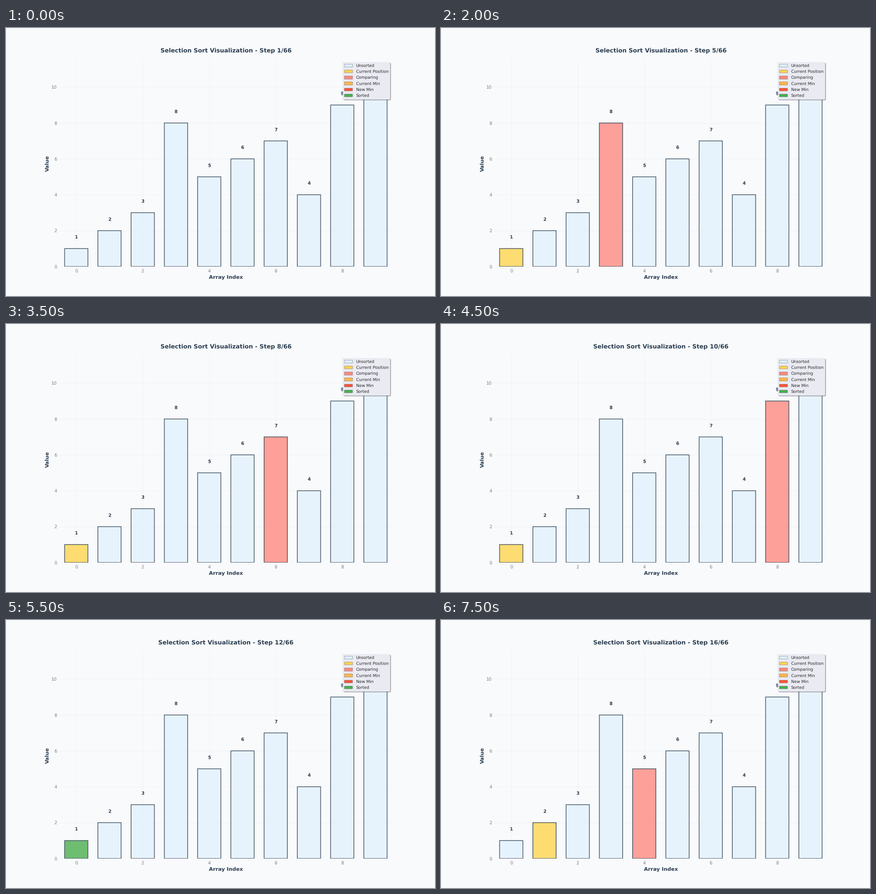
These frames come from a looping animation (947x592 px, 8 s). A matplotlib script:

```python
from itertools import islice

import matplotlib.pyplot as plt
from matplotlib.animation import FuncAnimation
from matplotlib.patches import Patch

plt.rcParams.update({
    "font.family": "DejaVu Sans",
    "text.hinting": "none",
    "toolbar": "None",
})

WIDTH, HEIGHT = 947, 592
DPI = WIDTH / 16
STEPS, STEP_MS, TOTAL_STEPS = 16, 500, 66

VALUES = [1, 2, 3, 8, 5, 6, 7, 4, 9, 10]
BACKGROUND = "#F8FAFC"
INK = "#2C3E50"
COLORS = {
    "Unsorted": "#E3F2FD",
    "Current Position": "#FFD54F",
    "Comparing": "#FF8A80",
    "Current Min": "#FFB74D",
    "New Min": "#FF5733",
    "Sorted": "#4CAF50",
}


def sort_steps(count):
    """Yield the highlighted bars of each step as {index: state}."""
    yield {}
    for i in range(count):
        yield {i: "Current Position"}
        for j in range(i + 1, count):
            yield {i: "Current Position", j: "Comparing"}
        yield {i: "Sorted"}


steps = list(islice(sort_steps(len(VALUES)), STEPS))

fig, ax = plt.subplots(figsize=(WIDTH / DPI, HEIGHT / DPI), dpi=DPI)
fig.set_facecolor(BACKGROUND)
ax.set_facecolor(BACKGROUND)
fig.subplots_adjust(left=0.125, right=0.9, bottom=0.11, top=0.88)

bars = ax.bar(range(len(VALUES)), VALUES, width=0.7, alpha=0.8,
              color=COLORS["Unsorted"], edgecolor=INK, linewidth=2)
for x, value in enumerate(VALUES):
    bars[x].set_snap(False)
    ax.text(x, value + 0.5, str(value), ha="center", va="bottom",
            fontsize=12, fontweight="bold", color=INK)

ax.set_xlim(-0.5, len(VALUES) - 0.5)
ax.set_ylim(0, max(VALUES) * 1.15)
ax.set_xticks(range(0, 10, 2))
ax.set_yticks(range(0, 11, 2))
ax.tick_params(length=0, pad=7, labelsize=12, labelcolor="#808080")
ax.spines[:].set_visible(False)
ax.set_axisbelow(True)
ax.grid(color="#E0E0E0", alpha=0.4, linewidth=1)

label_font = dict(fontsize=14, fontweight="bold", color=INK)
ax.set_xlabel("Array Index", **label_font)
ax.set_ylabel("Value", **label_font)
title = ax.set_title("", fontsize=16, fontweight="bold", color=INK, pad=20)

handles = [Patch(facecolor=color, edgecolor=INK, linewidth=0.5, label=name)
           for name, color in COLORS.items()]
legend = ax.legend(handles=handles, loc="upper right", fontsize=11,
                   shadow=True, framealpha=1, facecolor="#EAEAF2",
                   edgecolor="#CCCCCC", labelcolor="#262626")
legend.get_frame().set_linewidth(0.3)


def update(step):
    states = steps[step]
    for i, bar in enumerate(bars):
        bar.set_facecolor(COLORS[states.get(i, "Unsorted")])
    title.set_text(
        f"Selection Sort Visualization - Step {step + 1}/{TOTAL_STEPS}")
    return [*bars, title]


anim = FuncAnimation(fig, update, frames=STEPS, interval=STEP_MS,
                     repeat=True, repeat_delay=0)
plt.show()
```
